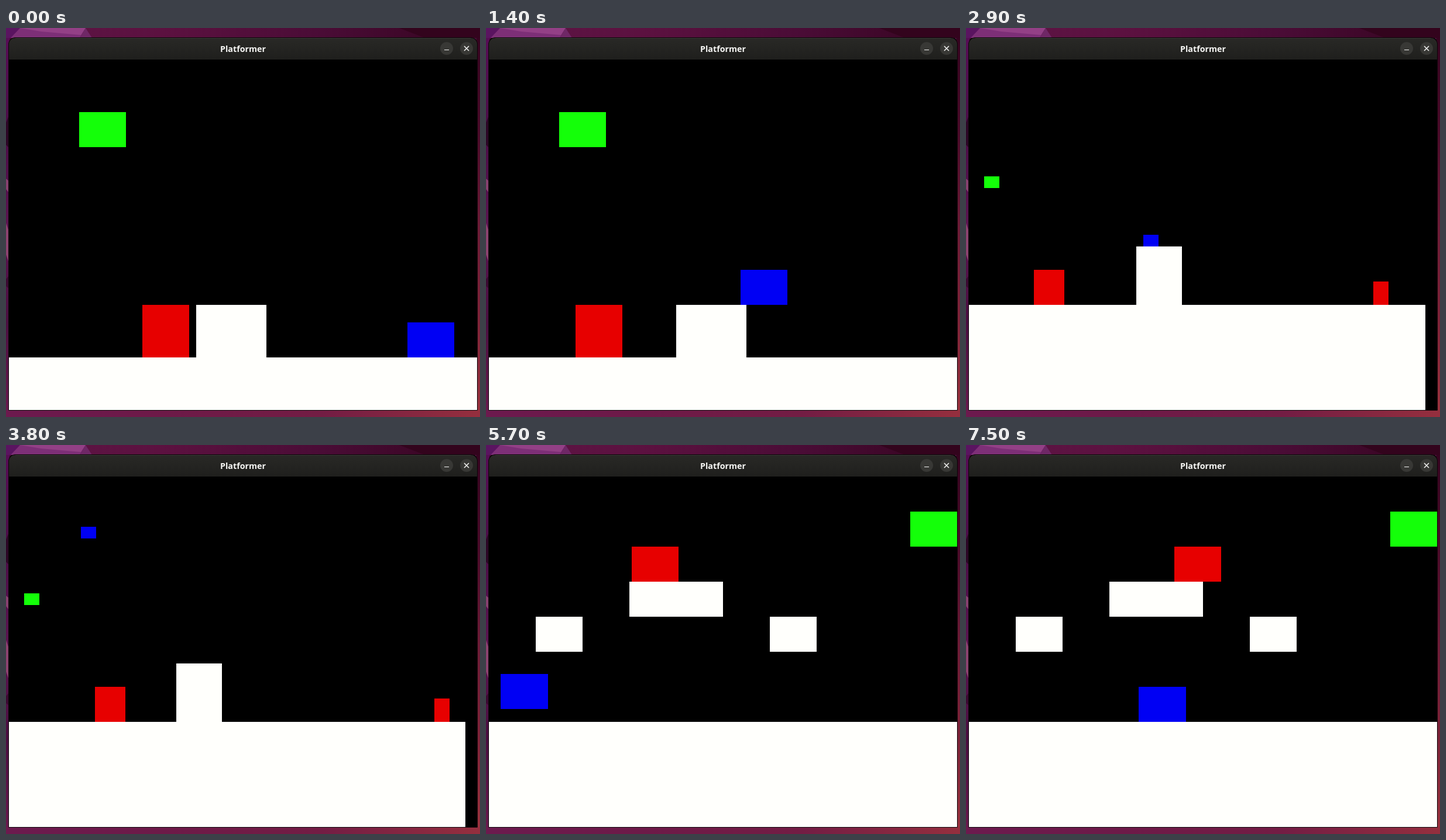
An HTML page with a canvas for the animation above (7.6 s loop, 810 px wide and 666 px high).

```html
<!DOCTYPE html>
<html lang="en">
<head>
<meta charset="utf-8">
<title>Platformer</title>
<style>
  html, body { margin: 0; width: 100%; height: 100%; overflow: hidden; background: #4a0d38; }
  canvas { display: block; width: 810px; height: 666px; }
</style>
</head>
<body>
<canvas id="stage" width="810" height="666"></canvas>
<script>
const ctx = document.getElementById('stage').getContext('2d');
const LOOP = 7600, STEP = 100;
const WHITE = '#fffffc', RED = '#e70000', GREEN = '#14ff09', BLUE = '#0000f4';
const GRAVITY = 1941, JUMP = 1092;

const clamp = (v, lo, hi) => Math.max(lo, Math.min(hi, v));

function box(color, x, y, w, h) {
  ctx.fillStyle = color;
  ctx.fillRect(Math.round(x), Math.round(y), w, h);
}

function poly(color, ...pts) {
  ctx.fillStyle = color;
  ctx.beginPath();
  for (let i = 0; i < pts.length; i += 2) ctx.lineTo(pts[i], pts[i + 1]);
  ctx.fill();
}

function gradient(x0, y0, x1, y1, ...colors) {
  const g = ctx.createLinearGradient(x0, y0, x1, y1);
  colors.forEach((c, i) => g.addColorStop(i / (colors.length - 1), c));
  return g;
}

// Linear run between two moments, held before and after
function run(t, t0, x0, t1, x1) {
  return x0 + (x1 - x0) * clamp((t - t0) / (t1 - t0), 0, 1);
}

// Ballistic height from a launch, stopping at the landing level
function leap(t, start, from, land, speed = JUMP) {
  const s = (t - start) / 1000;
  if (s <= 0) return from;
  const y = from - speed * s + GRAVITY / 2 * s * s;
  return s > speed / GRAVITY ? Math.min(y, land) : y;
}

function levelOne(t) {
  box(WHITE, 5, 564, 800, 90);
  box(WHITE, 325, 474, 120, 90);
  box(GREEN, 125, 144, 80, 60);
  box(RED, 233 - t * 0.0573, 474, 80, 90);
  const x = run(t, 580, 686, 2200, 190);
  const y = t < 1966 ? leap(t, 350, 504, 414) : leap(t, 1966, 414, 504);
  box(BLUE, x, y, 80, 60);
}

function levelTwo(t) {
  box(WHITE, 5, 474, 780, 180);
  box(WHITE, 291, 374, 78, 100);
  box(GREEN, 31, 254, 26, 20);
  const walk = (t - 3800) * 0.04;
  box(RED, 152 + walk, 414, 52, 60);
  box(RED, 732 + walk, 434, 26, 40);
  const x = t < 4400 ? run(t, 2210, 438, 3933, 102) : run(t, 4400, 102, 4640, 56);
  const y = t < 2927 ? leap(t, 2210, 454, 354, 740)
    : t < 4440 ? leap(t, 2927, 354, 454) : leap(t, 4440, 454, 454);
  box(BLUE, x, y, 26, 20);
}

function levelThree(t) {
  box(WHITE, 5, 504, 800, 150);
  box(GREEN, 725, 54, 80, 450);
  box(RED, 19 + (t - 4900) * 0.058, 384, 161, 120);
  const x = t < 4900 ? run(t, 4640, 288, 4900, 365) : run(t, 4900, 365, 5633, 566);
  box(BLUE, x, leap(t, 4776, 414, 414), 161, 90);
}

function levelFour(t) {
  box(WHITE, 5, 474, 800, 180);
  box(WHITE, 245, 234, 160, 60);
  box(WHITE, 85, 294, 80, 60);
  box(WHITE, 485, 294, 80, 60);
  box(GREEN, 725, 114, 80, 60);
  box(RED, 249 + (t - 5700) * 0.0594, 174, 80, 60);
  box(BLUE, run(t, 6000, 25, 6900, 295), leap(t, 5633, 354, 414, -505), 81, 60);
}

function wallpaper() {
  box(gradient(0, 0, 810, 0, '#5d1545', '#5c1140', '#4a0c36', '#35041f'), 0, 0, 810, 17);
  poly('#5a1460', 0, 0, 24, 0, 10, 17, 0, 17);
  poly('#7d2f77', 24, 0, 136, 0, 126, 17, 8, 17);
  poly('#934086', 24, 0, 136, 0, 128, 12, 60, 6);
  poly('#6f2766', 136, 0, 147, 17, 126, 17);
  poly('#33041d', 672, 0, 810, 0, 810, 17, 716, 17);
  box(gradient(0, 17, 0, 666, '#570c55', '#4a0c46', '#5b1450', '#4a0e40', '#6b1a4e'), 0, 17, 6, 649);
  poly('#2c0626', 0, 162, 5, 150, 5, 205, 0, 200);
  poly('#86406f', 0, 258, 5, 262, 5, 282, 0, 276);
  poly('#8b426f', 0, 334, 5, 348, 5, 402, 0, 388);
  poly('#3b0932', 0, 430, 5, 424, 5, 446, 0, 442);
  box(gradient(0, 17, 0, 666, '#35041f', '#4a0b29', '#6b1c36', '#7d2438', '#9b343e'), 804, 17, 6, 649);
  box(gradient(0, 0, 810, 0, '#6c1a4e', '#6d1a48', '#731d44', '#952f3e'), 0, 654, 810, 12);
}

function frame() {
  ctx.fillStyle = '#0b0508';
  ctx.beginPath();
  ctx.roundRect(4, 16, 802, 639, [12, 12, 1, 1]);
  ctx.fill();

  ctx.fillStyle = gradient(0, 17, 0, 54, '#292926', '#1f1f1d');
  ctx.beginPath();
  ctx.roundRect(5, 17, 800, 37, [11, 11, 0, 0]);
  ctx.fill();
  box('#383835', 16, 17, 778, 1);

  ctx.fillStyle = '#f7f7f5';
  ctx.font = 'bold 14.3px "Open Sans", "Noto Sans", sans-serif';
  ctx.textAlign = 'center';
  ctx.fillText('Platformer', 405, 41);

  ctx.fillStyle = '#383835';
  for (const x of [753, 787]) {
    ctx.beginPath();
    ctx.arc(x, 35, 11, 0, Math.PI * 2);
    ctx.fill();
  }
  box('#f7f7f5', 749, 37, 8, 1);
  ctx.strokeStyle = '#f7f7f5';
  ctx.lineWidth = 1.5;
  ctx.beginPath();
  ctx.moveTo(783, 31);
  ctx.lineTo(791, 39);
  ctx.moveTo(791, 31);
  ctx.lineTo(783, 39);
  ctx.stroke();
  box('#000', 5, 54, 800, 600);
}

function draw(t) {
  wallpaper();
  frame();
  ctx.save();
  ctx.beginPath();
  ctx.rect(5, 54, 800, 600);
  ctx.clip();
  const level = t < 2210 ? levelOne : t < 4640 ? levelTwo : t < 5633 ? levelThree : levelFour;
  level(t);
  ctx.restore();
}

const begin = performance.now();
function tick() {
  const t = (performance.now() - begin) % LOOP;
  draw(Math.floor(t / STEP) * STEP);
  requestAnimationFrame(tick);
}
tick();
</script>
</body>
</html>
```
